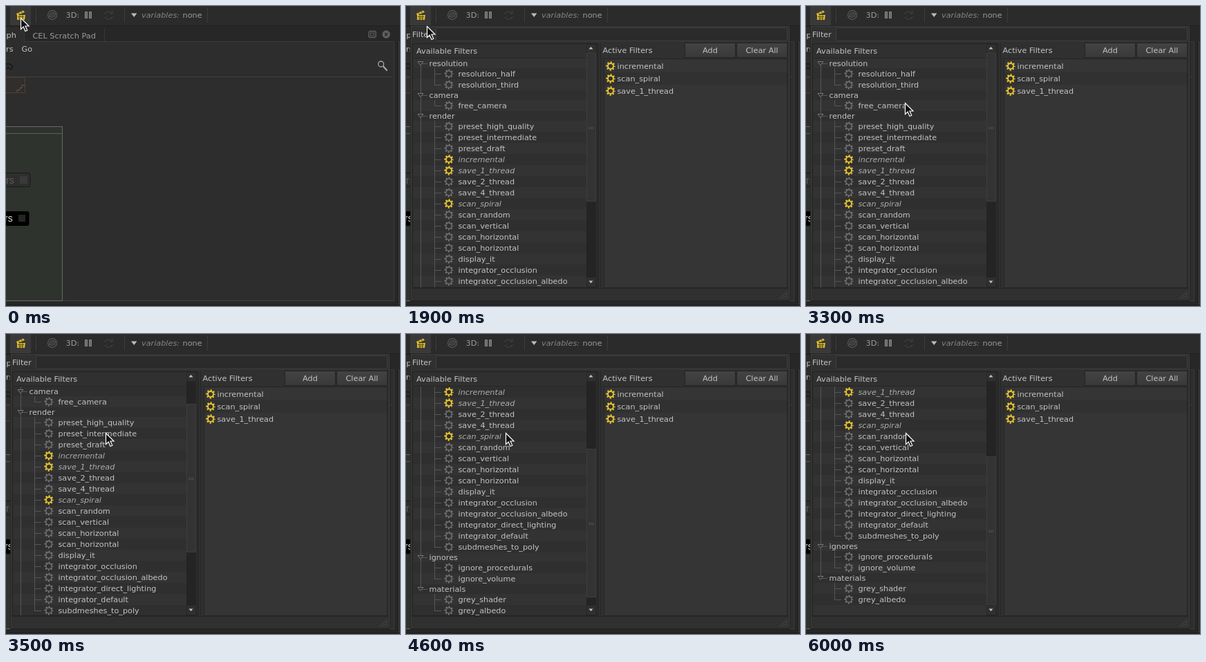
An HTML page for the animation above (6.6 s loop, 570 px wide and 434 px high).

```html
<!DOCTYPE html>
<html lang="en">
<head>
<meta charset="utf-8">
<title>Render filters</title>
<style>
  html, body { margin: 0; width: 100%; height: 100%; overflow: hidden; background: #272727; }
  svg { display: block; width: 570px; height: 434px; font: 11.25px "DejaVu Sans", sans-serif; }
  text { fill: #c3c3c3; white-space: pre; }
  .line { fill: none; stroke: #565656; }
  .dim { fill: #9b9b9b; }
  .italic { font-style: italic; fill: #adadad; }
  .node { font: 14px "Liberation Sans", Arial, sans-serif; }
  #popup, #tree, #thumb, #cursor { animation: 6600ms step-end infinite; }
  #popup { animation-name: open; }
  #tree { animation-name: scroll; }
  #thumb { animation-name: thumb; }
  #cursor { animation-name: point; }

  @keyframes open {
    0% { visibility: hidden; }
    12.12%, 100% { visibility: visible; }
  }
  @keyframes scroll {
    0% { transform: translateY(0); }
    51.51% { transform: translateY(-46px); }
    57.57% { transform: translateY(-90px); }
    65.15% { transform: translateY(-138px); }
    74.24%, 100% { transform: translateY(-154px); }
  }
  @keyframes thumb {
    0% { transform: translateY(0); }
    51.51% { transform: translateY(33px); }
    57.57% { transform: translateY(66px); }
    65.15% { transform: translateY(98px); }
    74.24%, 100% { transform: translateY(109px); }
  }
  @keyframes point {
    0% { transform: translate(21px, 16px); }
    28.78% { transform: translate(30px, 28px); }
    30.3% { transform: translate(62px, 64px); }
    31.81% { transform: translate(87px, 87px); }
    34.84% { transform: translate(104px, 95px); }
    36.36% { transform: translate(123px, 104px); }
    37.87% { transform: translate(133px, 121px); }
    39.39% { transform: translate(140px, 135px); }
    42.42% { transform: translate(142px, 137px); }
    45.45% { transform: translate(143px, 139px); }
    51.51%, 100% { transform: translate(144px, 142px); }
  }
</style>
</head>
<body>
<svg viewBox="0 0 570 434">
  <defs>
    <g id="gear" fill="none">
      <circle r="4.1" stroke-width="1.2"/>
      <circle r="5.4" stroke-width="2" stroke-dasharray="2.12 2.12" stroke-dashoffset="1.06"/>
    </g>
    <g id="gear-on" fill="none">
      <circle r="4" stroke-width="2"/>
      <circle r="5.6" stroke-width="2.2" stroke-dasharray="2.2 2.2" stroke-dashoffset="1.1"/>
    </g>
    <linearGradient id="button" x2="0" y2="1">
      <stop stop-color="#434343"/><stop offset="1" stop-color="#393939"/>
    </linearGradient>
    <clipPath id="list"><rect x="11" y="76" width="250" height="331"/></clipPath>
  </defs>

  <!-- main window -->
  <rect width="570" height="434" fill="#272727"/>
  <rect width="570" height="28" fill="#2b2b2b"/>
  <rect x="6" width="30" height="28" fill="#393939"/>
  <path class="line" d="M43.5 2V24M171.5 2V24M291.5 2V24" stroke-opacity=".45"/>
  <path d="M0 28.5H570" stroke="#202020"/>
  <g fill="#dcbc33">
    <path d="M16 13H28L27 20H16Z"/>
    <path d="M15 11L25 6.5L27 9L16 13.5Z"/>
    <path d="M18 9.5L20 12M22 8L24 10.5M17 15.5H26M18 18H25M20 13V20M24 13V20" stroke="#594b18"/>
  </g>
  <g fill="none" stroke="#555" stroke-width="1.3">
    <circle cx="67" cy="13" r="6.5"/>
    <path d="M63 15Q63 9 68 10T71 12M71 11Q71 17 66 16T63 14M65 13H69"/>
    <path d="M143 12A6 6 0 0 1 154 11M154 15A6 6 0 0 1 143 16M154 7V11H150" stroke="#3d3d3d"/>
  </g>
  <text class="dim" x="86.5" y="17">3D:</text>
  <path d="M114.5 8.5H117.5V17.5H114.5ZM120.5 8.5H123.5V17.5H120.5Z" fill="#666" stroke="#8a8a8a"/>
  <path d="M181 10.5H189.5L185.2 16Z" fill="#bbb"/>
  <text class="italic" x="196" y="17" style="fill:#858585">variables:</text>
  <text class="dim" x="255.5" y="17">none</text>

  <rect y="52" width="561" height="375" fill="#2d2d2d"/>
  <rect y="31" width="26" height="22" fill="#2d2d2d"/>
  <path d="M26.5 52V31M142.5 33V51" stroke="#383838"/>
  <path d="M26 51.5H561.5V426.5H0" class="line" stroke-opacity=".45"/>
  <rect x="567" y="51" width="3" height="383" fill="#303030"/>
  <path d="M566.5 51V434M0 432.5H570" stroke="#1f1f1f"/>
  <text x="0.5" y="46">ph</text>
  <text class="dim" x="38.5" y="47">CEL Scratch Pad</text>
  <g fill="none" stroke="#606060" stroke-width="1.4">
    <rect x="525" y="36.5" width="10" height="9" rx="2"/>
    <rect x="527.5" y="39" width="5" height="4" stroke-width="1"/>
    <circle cx="550" cy="41" r="5" fill="#606060"/>
    <path d="M548 39L552 43M552 39L548 43" stroke="#272727"/>
  </g>
  <text x="0" y="66">rs</text>
  <text x="22.5" y="66">Go</text>
  <path d="M0 84H6L10 87.5L7 92L3 89L0 91" fill="none" stroke="#171717" stroke-width="1.3"/>
  <circle cx="542.5" cy="84" r="4" fill="none" stroke="#aaa" stroke-width="1.3"/>
  <path d="M545.5 87L551.5 93.5" stroke="#aaa" stroke-width="2"/>
  <path d="M0 102.5H559" stroke="#404040"/>
  <path d="M-1 103H27.5V125.5H-1Z" fill="#312e2c" stroke="#4e4036"/>
  <path d="M16 124.5V121.5H20V118.5H23V114.5H27" fill="none" stroke="#6a5542"/>
  <rect x="-1" y="174.5" width="82.5" height="252" fill="#2e332e" stroke="#686868"/>
  <path d="M0 184.5H81" stroke="#5c5c5c"/>
  <rect x="-9" y="241.5" width="44" height="20" rx="3" fill="#2d2e2d" stroke="#191919"/>
  <text class="node" x="0" y="257" style="fill:#5b5b5b">rs</text>
  <rect x="20" y="246" width="11" height="11" fill="#393939"/>
  <rect x="-9" y="297" width="42.5" height="21" rx="3"/>
  <text class="node" x="-2" y="312" style="fill:#ddd">rs</text>
  <rect x="18" y="302" width="10" height="10" fill="#252525"/>
  <rect y="427" width="566" height="5" fill="#272727"/>

  <!-- filter popup -->
  <g id="popup">
    <rect x="6.5" y="28.5" width="549" height="398" fill="#303030" stroke="#232323"/>
    <path d="M7.5 426V29.5H554.5V426" class="line" stroke-opacity=".35"/>
    <text x="9" y="45">Filter</text>
    <rect x="43.5" y="31.5" width="508" height="19" rx="1" fill="#2b2b2b" stroke="#3f3f3f"/>
    <rect x="9.5" y="54.5" width="267" height="353" fill="#303030" stroke="#222"/>
    <text x="15" y="69">Available Filters</text>
    <path d="M11 75.5H261" stroke="#262626"/>
    <rect x="11" y="76" width="250" height="331" fill="#333"/>
    <g clip-path="url(#list)"><g id="tree"></g></g>

    <rect x="261" y="55" width="14" height="352" fill="#242424"/>
    <rect x="261.5" y="55.5" width="13" height="13" fill="#303030" stroke="#262626"/>
    <rect x="261.5" y="392.5" width="13" height="14" fill="#303030" stroke="#262626"/>
    <path d="M264.5 62.5H270.5L267.5 59ZM264.5 397.5H270.5L267.5 401Z" fill="#c5c5c5"/>
    <g id="thumb">
      <rect x="261.5" y="68.5" width="13" height="214" fill="#333" stroke="#3d3d3d"/>
      <path d="M264 175.5H272M264 177.5H272" stroke="#4b4b4b"/>
    </g>
    <path d="M278.5 55V408M281.5 55V408" stroke="#262626"/>

    <text x="284.5" y="68">Active Filters</text>
    <g fill="url(#button)" stroke="#232323">
      <rect x="403.5" y="53.5" width="73" height="21"/>
      <rect x="478.5" y="53.5" width="73" height="21"/>
    </g>
    <g text-anchor="middle">
      <text x="440" y="68">Add</text>
      <text x="515" y="68">Clear All</text>
    </g>
    <rect x="286.5" y="76.5" width="265" height="331" fill="#353535" stroke="#242424"/>
    <g id="active"></g>
    <path d="M540 424L552 412M544 424L552 416M548 424L552 420" stroke="#484848"/>
    <path d="M8 408.5H553" stroke="#262626"/>
  </g>

  <path id="cursor" d="M.5 1.5V17.5L4.2 14L7 20.5L9.8 19.3L7 13H12Z" fill="#111" stroke="#fff" stroke-width="1.2"/>
</svg>

<script>
  const groups = {
    resolution: "resolution_half resolution_third",
    camera: "free_camera",
    render: "preset_high_quality preset_intermediate preset_draft incremental " +
      "save_1_thread save_2_thread save_4_thread scan_spiral scan_random scan_vertical " +
      "scan_horizontal scan_horizontal display_it integrator_occlusion " +
      "integrator_occlusion_albedo integrator_direct_lighting integrator_default " +
      "subdmeshes_to_poly",
    ignores: "ignore_procedurals ignore_volume",
    materials: "grey_shader grey_albedo"
  };
  const activeNames = ["incremental", "scan_spiral", "save_1_thread"];
  const groupHeight = 14, leafHeight = 16, listTop = 76;

  const gear = (x, y, on) =>
    `<use href="#gear${on ? "-on" : ""}" x="${x}" y="${y}" stroke="${on ? "#e5c233" : "#777"}"/>`;
  const label = (x, y, name, italic) =>
    `<text x="${x}" y="${y + 4}"${italic ? ' class="italic"' : ""}>${name}</text>`;
  const line = d => `<path class="line" d="${d}"/>`;

  let rowY = listTop, rowIndex = 0, bands = "", marks = "", lastGroup;
  function addRow(height) {
    if (rowIndex++ % 2) {
      bands += `<rect x="11" y="${rowY}" width="250" height="${height}" fill="#2f2f2f"/>`;
    }
    rowY += height;
    return rowY - height / 2;
  }

  for (const [group, names] of Object.entries(groups)) {
    const head = lastGroup = addRow(groupHeight);
    let mid;
    marks += line(`M21 ${head + .5}H31`) + label(33.5, head, group) +
      `<path d="M17 ${head - 2.5}H25L21 ${head + 2.5}Z" fill="#303030" stroke="#777"/>`;
    for (const name of names.split(" ")) {
      const on = activeNames.includes(name);
      mid = addRow(leafHeight);
      marks += line(`M42 ${mid + .5}H51`) + gear(62, mid, on) + label(75.5, mid, name, on);
    }
    marks += line(`M41.5 ${head + 7}V${mid + 1}`);
  }
  document.getElementById("tree").innerHTML =
    bands + line(`M21.5 ${listTop + 7}V${lastGroup}`) + marks;

  document.getElementById("active").innerHTML = activeNames.map((name, i) => {
    const mid = 87 + 18 * i;
    const band = i % 2 ? `<rect x="287" y="${mid - 9}" width="264" height="18" fill="#313131"/>` : "";
    return band + gear(296, mid, true) + label(305.5, mid, name);
  }).join("");
</script>
</body>
</html>
```
